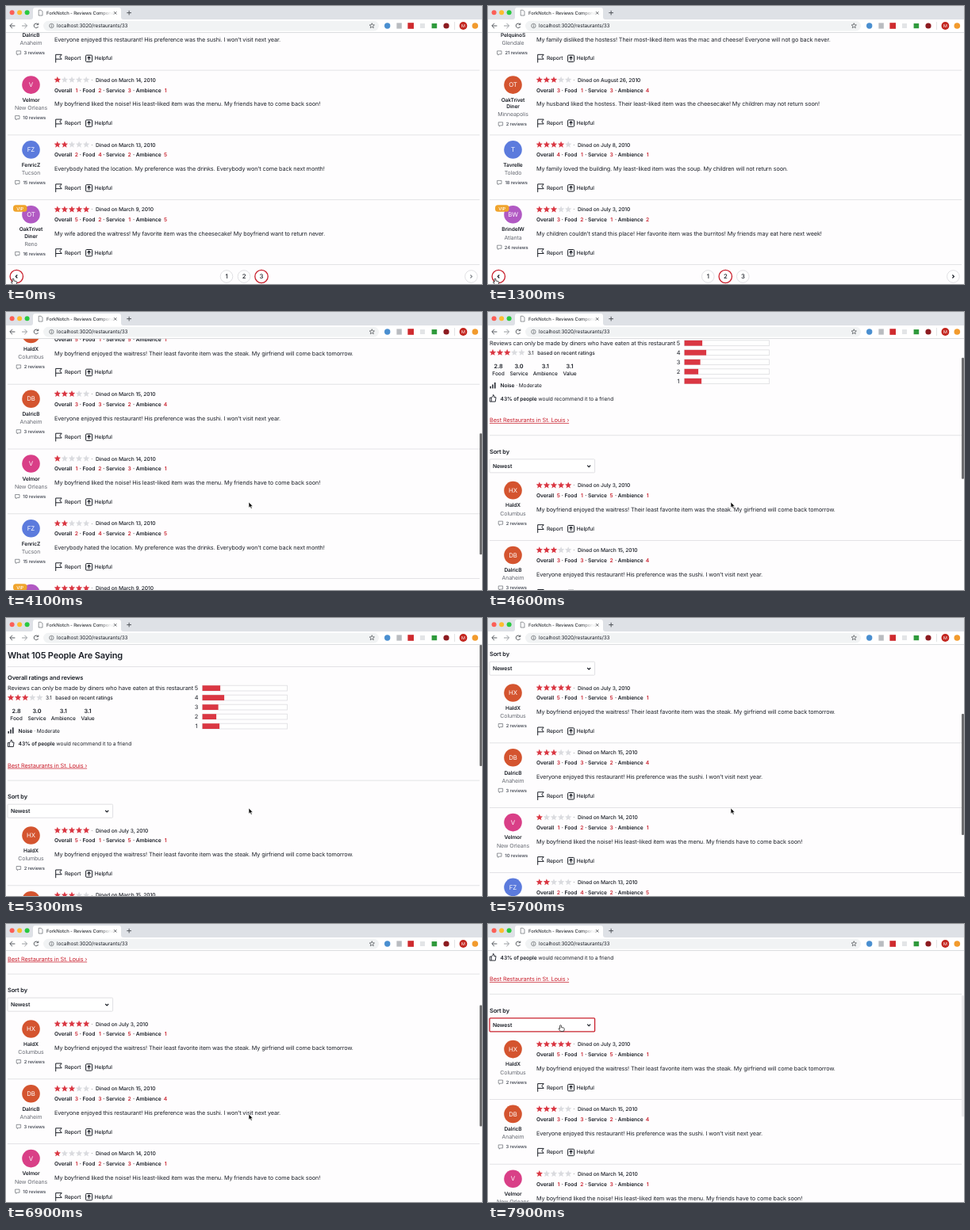
Animation, 600 px wide and 351 px high, one loop 8000 ms. Source, as an HTML page:

```html
<!DOCTYPE html>
<html lang="en">
<head>
<meta charset="utf-8">
<title>Reviews</title>
<style>
html, body { margin: 0; width: 100%; height: 100%; overflow: hidden; background: #fff; }
svg { display: block; width: 600px; height: 351px; }
text { font-family: Inter, "Liberation Sans", sans-serif; letter-spacing: -.015em; text-rendering: geometricPrecision; white-space: pre; }
</style>
</head>
<body>
<svg id="stage" viewBox="0 0 600 351"></svg>
<script>
const RED = '#da3743', DEEP_RED = '#c9202d', INK = '#1b1f27', GREY = '#666a72', RULE = '#dcdde0';
const LOOP = 8000, TOP = 34, FIRST = 268.2, PITCH = 81.8, PAGE_HEIGHT = 656;
const ORANGE = '#d4542f', PINK = '#d93f87', BLUE = '#5c7bdd', PURPLE = '#b159c3';

// Text is placed by its optical middle.
const text = (x, y, str, size = 7.28, o = {}) =>
  `<text x="${x}" y="${y + size * .36}" font-size="${size}" font-weight="${o.w || 400}" fill="${o.c || INK}" text-anchor="${o.a || 'start'}" ${o.more || ''}>${str}</text>`;
const rect = (x, y, w, h, fill, more = '') =>
  `<rect x="${x}" y="${y}" width="${w}" height="${h}" fill="${fill}" ${more}/>`;
const circle = (x, y, r, fill, more = '') =>
  `<circle cx="${x}" cy="${y}" r="${r}" fill="${fill}" ${more}/>`;
const path = (d, stroke = INK, width = 1, fill = 'none', more = '') =>
  `<path d="${d}" stroke="${stroke}" stroke-width="${width}" fill="${fill}" ${more}/>`;
const rule = y => rect(2, y, 595, .8, RULE);
const at = (x, y, body, id = '') => `<g ${id && `id="${id}"`} transform="translate(${x} ${y})">${body}</g>`;

function star(x, y, r, fill, stroke = 'none') {
  const points = Array.from({ length: 10 }, (_, i) => {
    const a = i * Math.PI / 5 - Math.PI / 2, d = i % 2 ? r * .45 : r;
    return (x + d * Math.cos(a)).toFixed(2) + ',' + (y + d * Math.sin(a)).toFixed(2);
  });
  return `<polygon points="${points.join(' ')}" fill="${fill}" stroke="${stroke}" stroke-width=".7"/>`;
}
const stars = (x, y, n) =>
  [0, 1, 2, 3, 4].map(i => star(x + i * 9.1, y, 4.4, i < n ? RED : '#dadbdf')).join('');

const review = (name, initials, color, city, count, date, scores, body, vip) =>
  ({ name, initials, color, city, count, date, scores, body, vip });

const pages = {
  2: [
    null,
    review('PelquinoS', 'PS', PINK, 'Glendale', 21, 'August 30, 2010', [4, 2, 1, 3],
      'My family disliked the hostess! Their most-liked item was the mac and cheese! Everyone will not go back never.'),
    review('OakTrivet Diner', 'OT', ORANGE, 'Minneapolis', 2, 'August 26, 2010', [3, 1, 3, 4],
      'My husband liked the hostess. Their least-liked item was the cheesecake! My children may not return soon!'),
    review('Tavrelle', 'T', BLUE, 'Toledo', 18, 'July 8, 2010', [4, 1, 3, 1],
      'My family loved the building. My least-liked item was the soup. My children will not return soon.'),
    review('BrindelW', 'BW', PURPLE, 'Atlanta', 24, 'July 3, 2010', [3, 2, 1, 2],
      'My children couldn\u2019t stand this place! Her favorite item was the burritos! My friends may eat here next week!', true)
  ],
  3: [
    review('HaldX', 'HX', ORANGE, 'Columbus', 2, 'July 3, 2010', [5, 1, 5, 1],
      'My boyfriend enjoyed the waitress! Their least favorite item was the steak. My girfriend will come back tomorrow.'),
    review('DalricB', 'DB', ORANGE, 'Anaheim', 3, 'March 15, 2010', [3, 3, 2, 4],
      'Everyone enjoyed this restaurant! His preference was the sushi. I won\u2019t visit next year.'),
    review('Velmor', 'V', PINK, 'New Orleans', 10, 'March 14, 2010', [1, 2, 3, 1],
      'My boyfriend liked the noise! His least-liked item was the menu. My friends have to come back soon!'),
    review('FenricZ', 'FZ', BLUE, 'Tucson', 15, 'March 13, 2010', [2, 4, 2, 5],
      'Everybody hated the location. My preference was the drinks. Everybody won\u2019t come back next month!'),
    review('OakTrivet Diner', 'OT', PURPLE, 'Reno', 16, 'March 9, 2010', [5, 2, 1, 5],
      'My wife adored the waitress! My favorite item was the cheesecake! My boyfriend want to return never.', true)
  ]
};

function reviewCard(r, i) {
  if (!r) return '';
  const mid = { a: 'middle' }, lines = r.name.split(' '), drop = lines.length > 1 ? 8.2 : 0;
  let s = circle(31.5, 6.3, 11.3, r.color)
    + text(31.5, 6.3, r.initials, 7.8, { c: '#fff', a: 'middle' });
  if (r.vip) s += rect(9, -5.6, 17.5, 8.4, '#f0a42c', 'rx="3.5"')
    + text(17.7, -1.3, 'VIP', 5.6, { w: 500, c: '#fff', a: 'middle' });
  lines.forEach((line, k) => s += text(31.5, 25.2 + k * 8.2, line, 6.6, { w: 600, ...mid }));
  s += text(31.5, 35.3 + drop, r.city, 6.95, { c: GREY, ...mid });
  const half = r.count > 9 ? 14.6 : 13, y = 47.7 + drop;
  s += text(35.7, y, r.count + ' reviews', 5.8, { w: 600, c: '#50555f', ...mid })
    + path(`M${29.2 - half - 3} ${y - 2.4}h5.4v4h-3l-1.2 1.3v-1.3h-1.2z`, GREY, .7);
  s += stars(64.8, 0, r.scores[0]) + text(107.3, 0, '\u00b7', 7)
    + text(113, 0, 'Dined on ' + r.date, 6.65, { w: 500 });
  const labels = ['Overall', 'Food', 'Service', 'Ambience'];
  const labelX = [61, 96.6, 126, 163.8], scoreX = [88.8, 118.4, 155.5, 201];
  labels.forEach((label, k) => {
    s += text(labelX[k], 12.8, label, 6.7, { w: 600 })
      + text(scoreX[k], 12.8, r.scores[k], 6.7, { w: 600, c: DEEP_RED, a: 'middle' });
    if (k) s += text(labelX[k] - 2.8, 12.8, '\u00b7', 6.7, { w: 600, a: 'middle' });
  });
  s += text(61, 30.5, r.body)
    + path('M62.7 60V49.8H70.2L67.8 52.7L70.2 55.6H62.7', INK, 1)
    + text(74, 54.5, 'Report', 6.6, { w: 500 })
    + rect(100.6, 50.6, 8, 8.4, 'none', `rx="1" stroke="${INK}"`)
    + path('M104.6 57.2V52.8M102.6 54.6L104.6 52.5L106.6 54.6', INK, 1.1)
    + text(111.8, 54.5, 'Helpful', 6.6, { w: 500 })
    + rule(69.2);
  return at(0, FIRST + i * PITCH, s);
}

function summary() {
  const bold = { w: 600 }, mid = { w: 500, a: 'middle' };
  let s = text(2, 47.3, 'What 105 People Are Saying', 11, bold) + rule(61)
    + text(2, 75, 'Overall ratings and reviews', 7.5, bold)
    + text(2, 88.4, 'Reviews can only be made by diners who have eaten at this restaurant')
    + stars(6, 100.6, 3) + text(50, 100.6, '3.1', 6.6)
    + text(62.3, 100.6, 'based on recent ratings', 6.6, { w: 500 });
  [['2.8', 'Food', 13], ['3.0', 'Service', 39], ['3.1', 'Ambience', 72.3], ['3.1', 'Value', 103]]
    .forEach(([score, label, x]) => s += text(x, 117.5, score, 7.3, { w: 600, a: 'middle' })
      + text(x, 126.7, label, 6.6, mid));
  [22.5, 27.5, 20, 17.5, 21.5].forEach((w, i) => {
    const y = 88.6 + i * 12;
    s += text(240, y, 5 - i, 7.4, { a: 'middle' })
      + rect(247.6, y - 3.4, 106.8, 6.8, '#fff', `stroke="${RULE}" stroke-width=".8"`)
      + rect(247.6, y - 3.4, w, 6.8, RED);
  });
  s += path('M3.2 145.8V143M6 145.8V140.8M8.8 145.8V138.3', INK, 1.5)
    + text(15.6, 142.4, '<tspan font-weight="600">Noise</tspan> \u00b7 Moderate', 6.6)
    + path('M2.3 157.5h2v5h-2zM4.3 158L6.3 155V154Q7.6 153.6 7.6 155.5V157H10L9.3 162.5H4.3', INK, .9)
    + text(15.6, 159, '<tspan font-weight="600">43% of people</tspan> would recommend it to a friend', 6.65)
    + text(2, 186, 'Best Restaurants in St. Louis \u203a', 7.35, { c: DEEP_RED, more: 'text-decoration="underline"' })
    + rule(204.7) + text(2, 225.6, 'Sort by', 7.4, bold)
    + rect(2, 235.2, 132.6, 17, '#fff', `id="select" rx="1" stroke="${RULE}"`)
    + text(6, 243.7, 'Newest', 6.8, bold)
    + path('M125.2 243L127.2 245L129.2 243', INK, 1.2);
  return s;
}

function pagination() {
  const button = (id, x, label) => circle(x, 680, 7.8, '#fff', `id="${id}"`) + label;
  const chevron = (id, x, dir) => button(id, x,
    path(`M${x - dir} 678L${x + dir} 680L${x - dir} 682`, INK, 1.2, 'none', `id="${id}Arrow"`));
  const numbers = [1, 2, 3].map(n => button('page' + n, 256 + n * 22,
    text(256 + n * 22, 680.1, n, 7.8, { a: 'middle', w: 500 }))).join('');
  return chevron('prev', 13.3, -1) + chevron('next', 586.4, 1) + `<g id="numbers">${numbers}</g>`;
}

function browserBar() {
  let s = rect(0, 0, 600, 17, '#dee1e6') + rect(0, 17, 600, 16.5, '#fff')
    + rect(0, 33.2, 600, .8, '#d3d5d8')
    + path('M31 17Q34 17 34 14V5Q34 2 37 2H142Q145 2 145 5V14Q145 17 148 17Z', 'none', 0, '#fff');
  ['#fc5f57', '#fdbc2e', '#29c940'].forEach((c, i) => s += circle(7.6 + i * 9.5, 8.3, 3, c));
  s += path('M41.2 5.2H44.2L46 7V12H41.2Z', '#666a70', .7)
    + text(51, 8.6, 'ForkNotch - Reviews Compone', 5.9, { w: 500, c: 'url(#fade)' })
    + path('M136 7.1L139.4 10.5M139.4 7.1L136 10.5', '#3d4146', .8)
    + path('M152.3 8.6H158M155.15 5.8V11.4', '#45494e', .9)
    + path('M11.4 25H5M8 21.8L4.8 25L8 28.2', '#45494e', .9)
    + path('M20 25H26.4M23.4 21.8L26.6 25L23.4 28.2', '#8d9196', .9)
    + path('M40.3 23.2A2.8 2.8 0 1 0 40.6 26M40.8 21.6V23.7H38.6', '#45494e', .9)
    + rect(47, 18.8, 423, 12.6, '#f1f3f4', 'rx="6.3"')
    + circle(57.4, 25, 2.7, 'none', 'stroke="#5f6368" stroke-width=".7"')
    + rect(57, 24.6, .8, 2, '#5f6368') + rect(57, 23.3, .8, .8, '#5f6368')
    + text(64, 25, 'localhost:3020/restaurants/33', 6.45, { c: INK })
    + star(461.3, 25, 3.3, 'none', '#45494e')
    + circle(480.7, 25, 3.7, '#4a8fd0')
    + rect(492.4, 21.4, 6.4, 7.2, '#b9bcc0')
    + rect(506.4, 21.2, 7.6, 7.6, '#cf2a2e')
    + rect(522, 22, 6, 6, '#e3e5e7')
    + rect(536.6, 22, 6.6, 6.2, '#2f9a3c')
    + circle(555, 25, 3.6, '#8c1b20')
    + rect(565.2, 20, .7, 10, '#d6d8da')
    + circle(576.4, 25, 4.9, '#c3261f')
    + text(576.4, 25, 'M', 5.4, { c: '#fff', a: 'middle' })
    + circle(591.3, 25, 3.8, '#f29b2d');
  return s;
}

const arrowCursor = path('M0 0V7.2L1.7 5.7L2.9 8.3L4.2 7.7L3 5.2H5.2Z', '#fff', .6, '#111');
const handCursor = path('M-.9 .6Q0 -.5 .9 .6V3L4 3.7Q5 4.1 4.8 5.2L4 8H0L-2.4 5Q-2.6 4 -1.6 4.2L-.9 4.8Z', '#222', .8, '#fff');

const stage = document.getElementById('stage');
stage.innerHTML = `<defs><linearGradient id="fade" gradientUnits="userSpaceOnUse" x1="118" x2="132" y1="0" y2="0">
  <stop stop-color="#33373c"/><stop offset="1" stop-color="#33373c" stop-opacity=".1"/></linearGradient></defs>`
  + rect(0, 0, 600, 351, '#fefdfe')
  + at(0, 0, summary()
    + [2, 3].map(n => `<g id="reviews${n}">${pages[n].map((r, i) =>
      n === 2 ? reviewCard(r, i) : reviewCard(r, i)).join('')}</g>`.replace(/^/, '')).join('')
    + pagination(), 'content')
  + rect(597, 0, 3, 153, '#6e6e70', 'id="thumb" rx="1"')
  + browserBar()
  + at(0, 0, `<g id="arrow">${arrowCursor}</g><g id="hand">${handCursor}</g>`, 'cursor');

const $ = id => document.getElementById(id);
const set = (id, attrs) => { for (const k in attrs) $(id).setAttribute(k, attrs[k]); };
const show = (id, on) => set(id, { display: on ? 'inline' : 'none' });

// Keys are [time, value, ...]; returns the interpolated values.
function track(keys, t, ease = p => p) {
  const i = keys.findIndex(k => k[0] > t);
  if (i < 0) return keys[keys.length - 1].slice(1);
  const a = keys[i - 1], b = keys[i], p = ease((t - a[0]) / (b[0] - a[0]));
  return a.slice(1).map((v, k) => v + (b[k + 1] - v) * p);
}
const smooth = p => p * p * (3 - 2 * p);

const scrollKeys = [[0, 338.5], [3700, 338.5], [3900, 310], [4100, 246.6], [4500, 70], [4800, 8], [4900, 0],
  [5400, 0], [5600, 90], [5800, 270], [6000, 339], [6400, 339], [6600, 280], [6900, 142], [7100, 120], [7200, 116.4]];
const cursorKeys = [[0, 9, 344], [1300, 9, 344], [2400, 591, 344.5], [3000, 591, 344.5],
  [3600, 306, 240], [7300, 306, 240], [7800, 91.5, 127.5]];
const fadeKeys = [[0, 0], [3600, 0], [3700, 1], [7500, 1], [7900, .12], [8000, 0]];

function draw(t) {
  const [scroll] = track(scrollKeys, t), [x, y] = track(cursorKeys, t, smooth);
  const page = t >= 500 && t < 2900 ? 2 : 3;
  const overButton = bx => Math.hypot(x - bx, y - 680 + scroll) < 8.5;
  const overSelect = x < 134 && Math.abs(y - 244 + scroll) < 8.5;
  const hover = { prev: overButton(13.3), next: overButton(586.4) };
  const outline = on => ({ stroke: on ? DEEP_RED : '#d8d9dc', 'stroke-width': on ? 1.3 : .8 });

  set('content', { transform: `translate(0 ${-scroll})` });
  [2, 3].forEach(n => show('reviews' + n, n === page));
  [1, 2, 3].forEach(n => set('page' + n, { ...outline(n === page), r: n === page ? 8.2 : 7.8 }));
  set('numbers', { transform: `translate(${page === 2 ? -.7 : 0} 0)` });
  for (const id in hover) set(id, { ...outline(hover[id]), r: hover[id] ? 8.2 : 7.8 });
  set('nextArrow', { stroke: page === 3 ? '#85898f' : INK });
  set('select', outline(overSelect));
  set('thumb', { y: TOP + scroll * (351 - TOP) / PAGE_HEIGHT, opacity: track(fadeKeys, t)[0] });

  const hand = hover.prev || hover.next || overSelect;
  set('cursor', { transform: `translate(${x} ${y})` });
  show('hand', hand);
  show('arrow', !hand);
}

const start = performance.now();
function tick() {
  const t = (performance.now() - start) % LOOP;
  draw(Math.floor(t / 100) * 100);
  requestAnimationFrame(tick);
}
tick();
</script>
</body>
</html>
```
